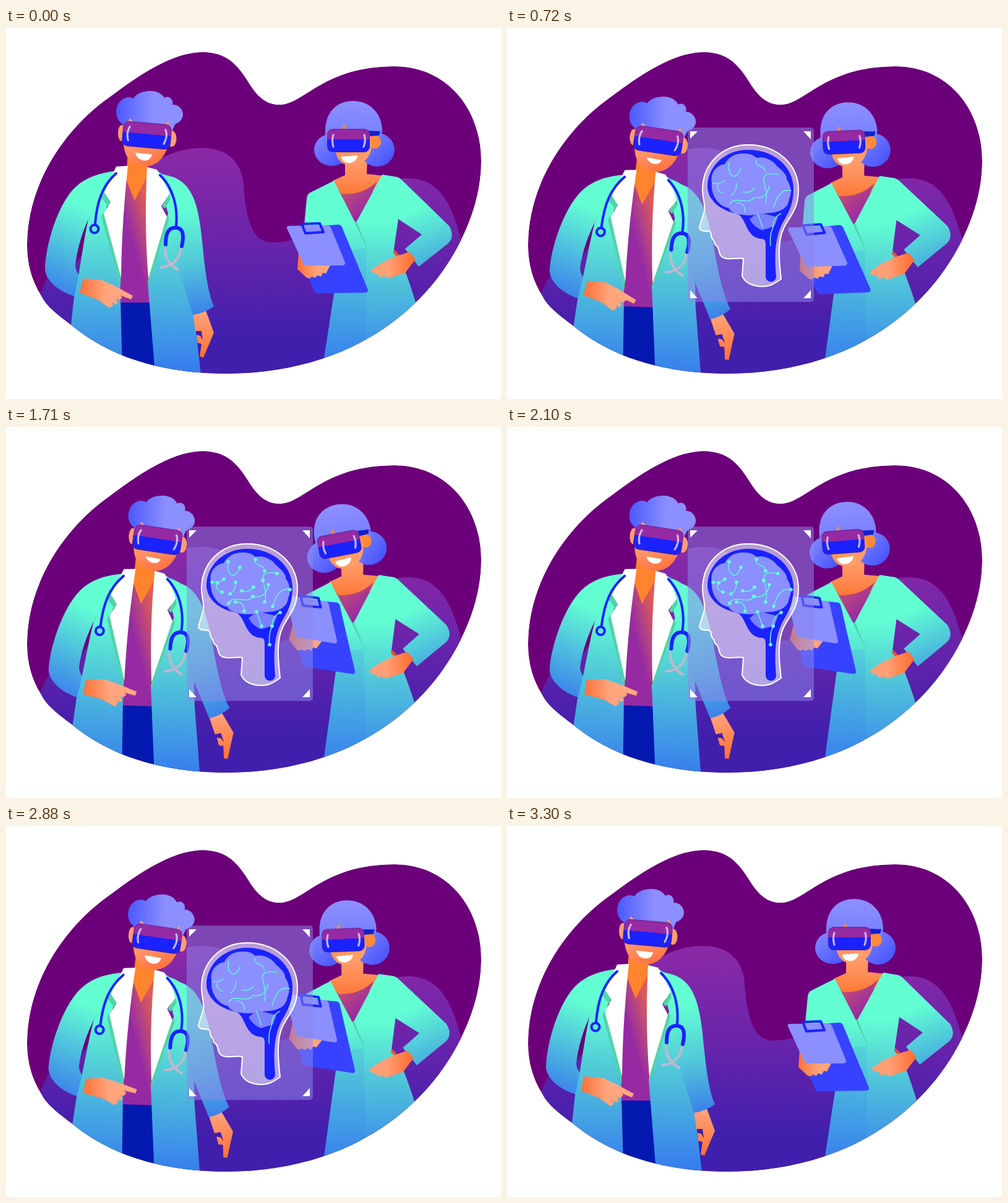
Animation, 800 px wide and 600 px high, one loop 3.57 s. Source, as an HTML page:

```html
<!DOCTYPE html>
<html lang="en">
<head>
<meta charset="utf-8">
<title>Doctors in VR</title>
<style>
html, body { margin: 0; width: 100%; height: 100%; overflow: hidden; background: #fff; }
svg { display: block; width: 800px; height: 600px; }
.line { fill: none; stroke: #1a22ff; stroke-width: 4; stroke-linecap: round; stroke-linejoin: round; }
.shine { fill: none; stroke: #c9b6ea; stroke-width: 3.2; stroke-linecap: round; }
.lens { fill: url(#lens); stroke: url(#rim); stroke-width: 2; }
.shade { fill: #52d3a8; }
.white { fill: #fff; }
</style>
</head>
<body>
<svg viewBox="0 0 800 600" xmlns="http://www.w3.org/2000/svg">
  <defs>
    <clipPath id="blob"><path id="blobShape" d="M318 39 C365 39 380 70 398 97 C412 117 426 124 442 124 C482 124 512 62 628 62 C712 62 768 130 768 215 C768 262 754 306 735 344 C675 465 545 559 355 559 C250 559 164 530 105 480 C85 465 65 450 57 433 C42 410 34 382 34 352 C34 250 97 161 167 112 C214 77 268 39 318 39Z"/></clipPath>
    <linearGradient id="hill" gradientUnits="userSpaceOnUse" x1="0" y1="200" x2="0" y2="500"><stop stop-color="#8a29a6"/><stop offset=".45" stop-color="#6c24aa"/><stop offset="1" stop-color="#401fad"/></linearGradient>
    <linearGradient id="coat" gradientUnits="userSpaceOnUse" x1="0" y1="290" x2="0" y2="550"><stop stop-color="#63ffd3"/><stop offset=".4" stop-color="#51c8d8"/><stop offset="1" stop-color="#377eee"/></linearGradient>
    <linearGradient id="sleeveL" gradientUnits="userSpaceOnUse" x1="135" y1="290" x2="82" y2="425"><stop stop-color="#63ffd3"/><stop offset="1" stop-color="#3c84ea"/></linearGradient>
    <linearGradient id="sleeveR" gradientUnits="userSpaceOnUse" x1="285" y1="290" x2="318" y2="465"><stop stop-color="#63ffd3"/><stop offset=".5" stop-color="#52c9d9"/><stop offset="1" stop-color="#3b7eea"/></linearGradient>
    <linearGradient id="coatW" gradientUnits="userSpaceOnUse" x1="0" y1="310" x2="0" y2="535"><stop stop-color="#63ffd3"/><stop offset=".4" stop-color="#52c9d8"/><stop offset="1" stop-color="#3b86ec"/></linearGradient>
    <linearGradient id="sleeveW" gradientUnits="userSpaceOnUse" x1="655" y1="295" x2="690" y2="385"><stop stop-color="#63ffd3"/><stop offset="1" stop-color="#46a8e0"/></linearGradient>
    <linearGradient id="shirt" gradientUnits="userSpaceOnUse" x1="198" y1="330" x2="238" y2="318"><stop stop-color="#962aa3"/><stop offset=".4" stop-color="#b04088"/><stop offset="1" stop-color="#df5c55"/></linearGradient>
    <linearGradient id="shirtW" gradientUnits="userSpaceOnUse" x1="550" y1="262" x2="580" y2="300"><stop stop-color="#c04a77"/><stop offset="1" stop-color="#962aa3"/></linearGradient>
    <linearGradient id="hair"><stop stop-color="#4a59ff"/><stop offset=".55" stop-color="#8b8fff"/></linearGradient>
    <linearGradient id="dome" x2="0" y2="1"><stop stop-color="#8d90ff"/><stop offset="1" stop-color="#747dff"/></linearGradient>
    <linearGradient id="bun" x2="1" y2="1"><stop stop-color="#858bff"/><stop offset="1" stop-color="#3f4cfb"/></linearGradient>
    <linearGradient id="face" x2=".4" y2="1"><stop stop-color="#ff9f76"/><stop offset=".6" stop-color="#ff9467"/><stop offset="1" stop-color="#ff7644"/></linearGradient>
    <linearGradient id="faceW" x2=".5" y2="1"><stop stop-color="#ff8532"/><stop offset="1" stop-color="#ff9e6b"/></linearGradient>
    <linearGradient id="hand"><stop stop-color="#ff6f35"/><stop offset=".6" stop-color="#ffa47d"/></linearGradient>
    <linearGradient id="handW" x1="1" x2="0"><stop stop-color="#ff6a2c"/><stop offset=".6" stop-color="#ff9f76"/></linearGradient>
    <linearGradient id="handD" x2="0" y2="1"><stop stop-color="#ffa47d"/><stop offset="1" stop-color="#ff6f35"/></linearGradient>
    <linearGradient id="neckW" x2="0" y2="1"><stop stop-color="#ff9c6c"/><stop offset=".45" stop-color="#ff8d55"/><stop offset="1" stop-color="#ff7432"/></linearGradient>
    <linearGradient id="lens" x2="0" y2="1"><stop offset=".45" stop-color="#962aa3"/><stop offset=".45" stop-color="#1a22ff"/></linearGradient>
    <linearGradient id="rim" x2="0" y2="1"><stop offset=".45" stop-color="#7d2a9e"/><stop offset=".45" stop-color="#3020c4"/></linearGradient>
  </defs>

  <g clip-path="url(#blob)">
    <use href="#blobShape" fill="#6c007a"/>
    <path fill="url(#hill)" d="M20 500 C55 440 64 400 72 400 C150 400 170 194 318 194 C360 194 382 220 384 255 C388 310 398 347 430 347 C525 347 560 243 650 243 C708 243 724 300 738 350 L760 600 H20Z"/>

    <g id="woman">
      <path fill="url(#neckW)" d="M548 212 H584 L583 236 L610 239 L594 264 L545 274 L528 247 L548 238Z"/>
      <path fill="url(#shirtW)" d="M539 268 C560 270 582 266 600 248 L566 320Z"/>
      <path fill="#e2552f" d="M627 358 L640 372 L625 382Z"/>
      <path fill="url(#coatW)" d="M530 247 L492 266 Q487 268 486 276 L480 340 L541 360 L530 430 L510 560 H690 L661 440 Q650 405 640 380 L626 364 L634 309 L640 246 L632 241 L608 237 L565 316Z"/>
      <path fill="#2f6bf0" fill-opacity=".12" d="M541 360 L582 356 V560 H510 L530 430Z"/>
      <path fill="url(#sleeveW)" d="M634 309 L672 334 L645 357 L667 386 L715 348 Q726 337 716 320 L640 246 Q636 242 632 241 L626 290Z"/>
      <path class="shade" d="M563 313 L567 313 L588 367Z"/>
      <path fill="url(#handW)" d="M662 374 L652 362 L628 370 L608 379 L589 392 L594 397 L601 398 L604 404 L611 401 L617 405 L645 396Z"/>
    </g>

    <g id="board">
      <path fill="#3742ff" d="M478 322 L537 318 Q541 318 543 322 L584 421 Q587 428 580 428 L504 429 Q500 429 498 425 L470 360Z"/>
      <path fill="url(#hand)" d="M473 362 L471 390 L486 404 L491 405 L494 402 L500 404 L503 400 L509 402 L512 396 L517 397 L524 384 L510 370Z"/>
      <path fill="#8b8fff" d="M457 320 L519 319 Q523 319 525 323 L548 379 Q549 384 543 384 L485 384 Q482 384 480 380 L454 324 Q453 320 457 320Z"/>
      <path class="line" d="M478 317 L507 316 L513 330 L484 332Z"/>
    </g>

    <g id="womanHead">
      <ellipse cx="527" cy="197" rx="29" ry="26" fill="url(#bun)"/>
      <ellipse cx="600" cy="197" rx="28" ry="27" fill="url(#bun)"/>
      <path fill="url(#dome)" d="M516 172 C514 135 536 118 561 118 C588 118 608 138 608 167 L604 184 H520Z"/>
      <ellipse cx="596" cy="184" rx="10" ry="11" fill="#ff8a3c"/>
      <path fill="url(#faceW)" d="M531 172 L541 169 L547 155 L551 167 L588 170 L591 190 C590 210 577 222 557 222 C541 222 533 210 531 192Z"/>
      <path fill="#101fd0" d="M584 166 L605 167 L603 174 L584 175Z"/>
      <rect class="lens" x="520" y="164" width="67" height="36" rx="8"/>
      <path class="shine" d="M529 173 Q526 182 529 192 M579 173 Q582 182 578 192"/>
      <path id="womanMouth" class="white"/>
    </g>

    <g id="man">
      <path fill="#0419b0" d="M184 440 H233 L243 560 H186Z"/>
      <path fill="url(#shirt)" d="M190 235 H234 V444 H183Z"/>
      <path fill="#ff842d" d="M197 200 L230 212 L228 240 L208 279 L194 245Z"/>
      <path fill="url(#sleeveL)" d="M180 231 C140 235 116 248 100 272 C78 304 64 356 63 390 C64 410 90 430 117 435 L125 405 Q113 398 112 385 C115 355 124 330 133 309 L170 250Z"/>
      <path fill="url(#coat)" d="M180 231 L133 309 C124 350 118 405 110 435 L104 490 L188 550 L184 400 L160 300Z M243 230 L262 300 L229 410 L241 560 H315 L301 440 L294 330 C298 270 285 245 252 236Z"/>
      <path class="shade" d="M158 298 L186 385 L185 417 L154 305Z M169 280 L165 288 L154 274 L158 265Z M261 302 L264 308 L230 416 V400Z M252 288 L264 268 L267 275 L257 292Z"/>
      <path class="white" d="M178 224 L197 223 C190 290 187 340 186 404 L158 300 L169 281 L159 266Z"/>
      <path class="white" d="M228 225 L244 229 L265 267 L251 288 L260 305 L230 405 C225 340 225 280 228 225Z"/>
      <g id="arm">
        <path id="armHand" fill="url(#handD)" d="M302 460 L323 457 L336 493 L319 533 L313 531 L316 511 L309 509 L308 496 L314 498 L318 505 L316 490 L306 490Z"/>
        <path fill="url(#sleeveR)" d="M258 238 C298 244 310 280 316 335 C321 385 325 425 336 450 Q322 461 302 464 L277 385 L270 300Z"/>
      </g>
      <g id="hand1">
        <path fill="url(#hand)" d="M125 405 L154 407 L176 418 L188 436 L182 440 L178 437 L181 445 L176 447 L172 443 L173 449 L167 453 L149 440 L119 428Z"/>
        <path id="finger" fill="#ffa780" d="M152 407 L172 415 L205 433 L202 439 L172 427Z"/>
      </g>
      <path class="line" d="M178 235 C156 255 147 280 144 317 M249 238 C270 258 278 290 275 320"/>
      <circle class="line" cx="143" cy="325" r="6.5"/>
      <path class="line" style="stroke:#c6b6ce" d="M257 357 C257 374 267 385 278 391 M283 357 C280 375 268 385 251 387"/>
      <path class="line" style="stroke-width:6" d="M258 350 C258 332 262 323 274 323 C287 323 288 336 284 353"/>
    </g>

    <g id="manHead">
      <path fill="url(#hair)" d="M188 155 C173 146 176 120 191 114 C197 111 202 112 206 114 C211 102 245 94 256 113 C264 108 271 116 269 124 C282 123 290 138 284 147 C281 153 275 154 273 156 L268 168 H192Z"/>
      <ellipse cx="187" cy="170" rx="6" ry="13" fill="#ff9c70"/>
      <ellipse cx="268" cy="179" rx="7.5" ry="13" fill="#ff9c70"/>
      <path fill="url(#face)" d="M193 160 L200 146 L208 153 L257 158 L262 150 L266 166 C264 205 246 224 224 224 C203 222 192 210 190 188Z"/>
      <g transform="rotate(5 228 174)">
        <rect class="lens" x="189" y="154" width="77" height="39" rx="9"/>
        <path class="shine" d="M199 162 Q194 172 198 184 M257 162 Q262 172 256 185"/>
      </g>
      <path id="manMouth" class="white"/>
    </g>

    <g id="panel">
      <rect id="glass" x="292" width="204" rx="5" fill="#8c87eb" fill-opacity=".52"/>
      <path id="cornersTop" class="white" d="M296 6 H308 L296 18Z M491 6 H479 L491 19Z"/>
      <path id="cornersBottom" class="white" d="M296 -6 H308 L296 -19Z M491 -6 H479 L491 -19Z"/>
    </g>
    <g id="scan">
      <path fill="#fff" fill-opacity=".46" stroke="#fff" stroke-width="2" stroke-linejoin="round" d="M390 189 C345 189 316 222 316 262 C316 276 321 286 319 296 L311 322 C311 329 320 328 327 329 C332 331 328 337 332 341 C336 345 334 348 337 351 C346 354 338 372 356 373 C368 374 374 371 382 373 L380 401 C386 414 400 418 414 418 C426 418 434 412 443 406 C440 380 436 345 448 322 C458 303 471 292 471 262 C471 220 436 189 390 189Z"/>
      <path id="cavity" fill="#1a22ff" d="M390 197 C350 197 324 226 324 256 C324 278 345 295 370 300 C388 304 384 340 412 341 Q418 341 418 350 L418 402 A8.5 8.5 0 0 0 435 402 C432 370 433 340 444 318 C452 302 463 290 463 260 C463 225 432 197 390 197Z"/>
    </g>
    <g id="brain">
      <path fill="#8b8fff" d="M331 250 C328 235 338 222 352 220 C358 207 372 202 384 203 C395 203 400 207 403 210 C416 207 430 214 437 224 C448 233 453 240 452 245 C460 255 460 270 456 276 C455 292 440 298 425 299 C410 300 400 303 390 303 C375 302 362 300 358 291 C340 288 329 268 331 250Z"/>
      <path fill="#7a80ff" d="M392 309 L406 298 L438 306 L432 321 L412 327 Q398 321 392 309Z"/>
      <path id="nerves" fill="none" stroke="#63f0dc" stroke-width="1.6" stroke-linecap="round" d="M333 251 Q344 253 352 246 M349 267 Q336 262 342 252 M359 218 C355 238 370 250 378 227 M403 214 C398 224 418 222 418 233 M362 270 Q371 266 371 251 M381 265 Q394 268 400 259 M360 285 C366 270 390 288 399 274 M371 283 Q385 282 385 298 M399 274 Q420 278 424 255 M438 237 Q412 232 415 248 M418 283 Q422 272 415 248 M459 263 Q440 258 431 290 M405 299 L413 322 M443 300 Q430 306 430 322 M430 322 Q424 336 426 352"/>
      <g id="dots" fill="#63ffd9"></g>
    </g>
  </g>
</svg>
<script>
const LOOP = 3570, STEP = 30;
const $ = id => document.getElementById(id);
const set = (id, name, value) => $(id).setAttribute(name, value);
const clamp = u => Math.max(0, Math.min(1, u));
const smooth = u => u * u * (3 - 2 * u);

// Timing shapes: a rise, a rise and fall with a hold between, and a bump.
const rise = (t, from, to) => smooth(clamp((t - from) / (to - from)));
const hold = (t, from, full, leave, gone) => rise(t, from, full) * (1 - rise(t, leave, gone));
const bump = (t, mid, half) => smooth(clamp(1 - Math.abs(t - mid) / half));

// Every nerve ends in dots, which light up from the upper left.
function addDot({ x, y }) {
  const dot = document.createElementNS("http://www.w3.org/2000/svg", "circle");
  dot.setAttribute("cx", x);
  dot.setAttribute("cy", y);
  dot.setAttribute("r", 2.8);
  $("dots").append(dot);
  return { dot, far: x - 315 + 1.4 * (y - 200) };
}
const dots = $("nerves").getAttribute("d").split("M").slice(1).flatMap(part => {
  const nerve = document.createElementNS("http://www.w3.org/2000/svg", "path");
  nerve.setAttribute("d", "M" + part);
  return [0, nerve.getTotalLength()].map(at => addDot(nerve.getPointAtLength(at)));
});

function mouth(x, y, w, top, bottom, tilt) {
  return `M${x - w} ${y - tilt} C${x - w} ${y - top - tilt} ${x + w} ${y - top + tilt} ${x + w} ${y + tilt} ` +
    `C${x + w * .8} ${y + bottom + tilt} ${x - w * .8} ${y + bottom - tilt} ${x - w} ${y - tilt}Z`;
}

const widen = (x, k) => `translate(${x * (1 - k)} 0) scale(${Math.max(k, .0001)} 1)`;

function drawMan(t, lean) {
  const settle = hold(t, 600, 1050, 3060, 3300), flick = bump(t, 3060, 220);
  const grin = Math.min(1, 1 - lean + rise(t, 1900, 2400));
  set("man", "transform", `matrix(1 ${.033 * lean} ${-.04 * lean} 1 ${21.4 * lean} 0)`);
  set("arm", "transform", `rotate(${-7 * lean} 285 270)`);
  set("armHand", "transform", `rotate(${-6 * lean} 312 462)`);
  set("hand1", "transform", `rotate(${-8 * settle - 5 * flick} 122 415)`);
  set("finger", "transform", `rotate(${3 * lean * (1 - settle) - 15 * flick} 155 409)`);
  set("manHead", "transform", `translate(${14 * lean} ${8 * lean}) rotate(${3.5 * lean} 215 225)`);
  set("manMouth", "d", mouth(222.5, 203, 12 + 1.5 * grin, 0, 11 + 4 * grin, 1.5));
}

function drawWoman(t, lean) {
  const look = bump(t, 1750, 500), talk = bump(t, 2540, 300);
  const nod = -2.5 * lean + 2.5 * bump(t, 1110, 300) - 8.5 * look;
  const lift = hold(t, 700, 1300, 2980, 3300), sag = lean * (1 - lift);
  set("woman", "transform", `matrix(1 ${-.02 * lean} ${.018 * lean} 1 ${-10.1 * lean} ${14.4 * lean})`);
  set("womanHead", "transform", `translate(${-7 * lean} ${2 * lean + 3 * look}) rotate(${nod} 565 225)`);
  set("womanMouth", "d", mouth(555 - talk, 207 + 2 * talk, 13.5 - 8 * talk, 5 * talk, 15 - 10 * talk, .8 * (talk - 1)));
  set("board", "transform", `translate(${2 * sag - 14 * lift} ${2 * sag - 43 * lift}) rotate(${9.5 * lift - 1.5 * sag} 490 390)`);
}

function drawScan(t) {
  const open = hold(t, 180, 330, 3150, 3300);
  const height = 282 * open + 50 * (bump(t, 350, 250) + bump(t, 3130, 250));
  const top = 302 - height / 2;
  set("glass", "y", top);
  set("glass", "height", height);
  set("cornersTop", "transform", `translate(0 ${top})`);
  set("cornersBottom", "transform", `translate(0 ${top + height})`);
  set("panel", "opacity", open);

  set("scan", "transform", widen(391, rise(t, 270, 540)));
  set("scan", "opacity", hold(t, 270, 330, 2880, 3160));
  set("cavity", "opacity", hold(t, 360, 600, 2880, 3150));

  const wide = hold(t, 480, 720, 2860, 3110);
  set("brain", "transform", widen(394, wide));
  set("brain", "opacity", wide > .01 ? 1 : 0);
  const reach = 350 * hold(t, 760, 1400, 2250, 2850);
  for (const { dot, far } of dots) dot.setAttribute("opacity", clamp((reach - far) / 14));
}

function draw(t) {
  // Both doctors lean in quickly and ease back to rest.
  const lean = (1 - (1 - clamp((t - 180) / 340)) ** 2) * (1 - rise(t, 2840, 3300));
  drawMan(t, lean);
  drawWoman(t, lean);
  drawScan(t);
}

function tick() {
  const t = performance.now() % LOOP;
  draw(Math.floor(t / STEP) * STEP);
  requestAnimationFrame(tick);
}
tick();
</script>
</body>
</html>
```
